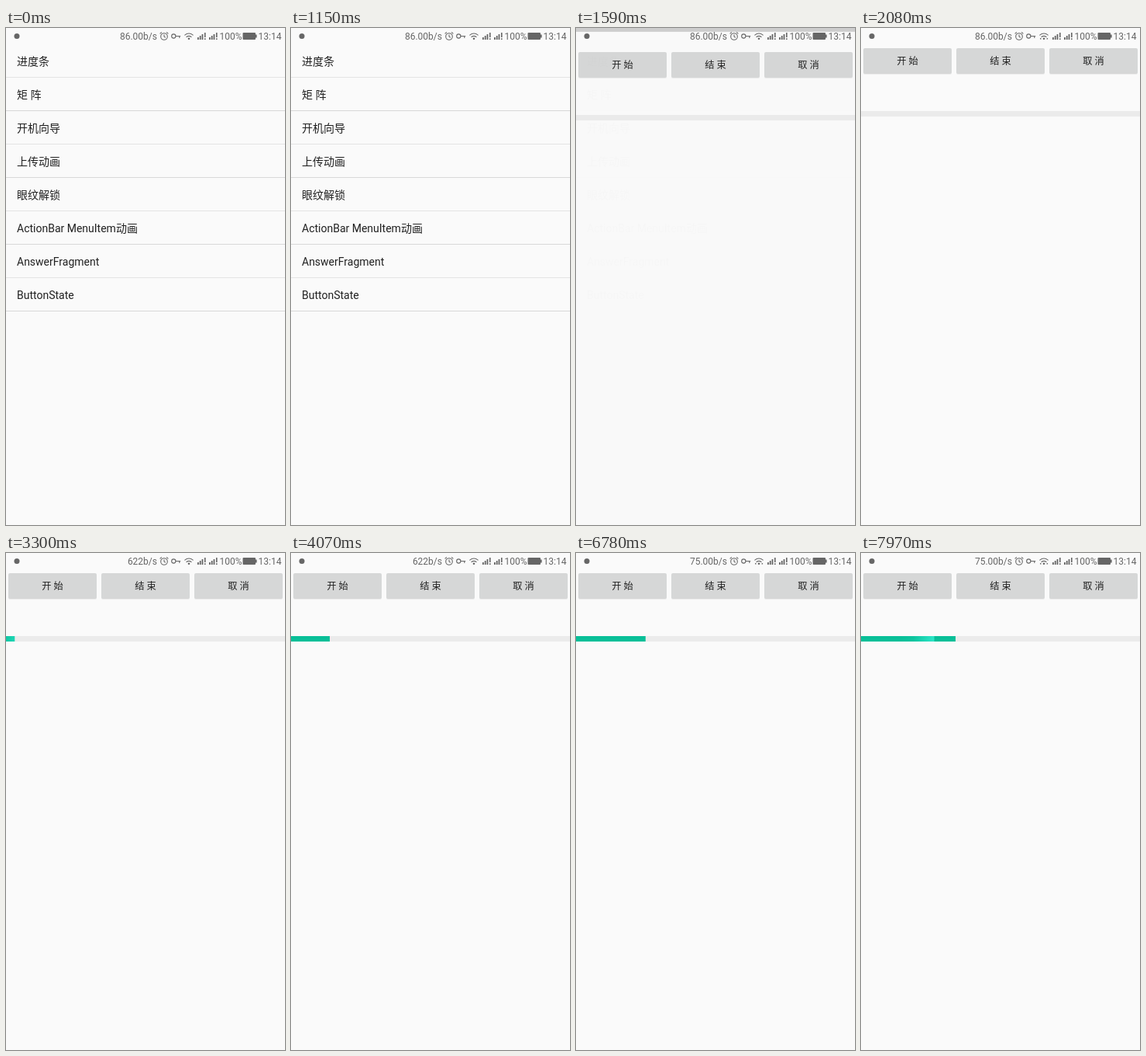
Write an HTML page that moves like this. It is 360 by 640 pixels and loops after 7990 ms.

```html
<!DOCTYPE html>
<html lang="zh-CN">
<head>
<meta charset="utf-8">
<style>
  html, body { margin: 0; width: 100%; height: 100%; overflow: hidden; background: #000; }
  svg { display: block; width: 100vw; height: 100vh; }
  text { font-family: Roboto, "Noto Sans CJK SC", "Noto Sans CJK", sans-serif; white-space: pre; }
  .bg { fill: #fafafa; }
  .row { font-size: 14px; fill: #212121; }
  .btn { font-size: 12.25px; font-weight: 500; fill: #212121; text-anchor: middle; }
  #status { font-size: 12px; fill: #666; stroke: none; }
  #status .line { fill: none; stroke: #666; }
</style>
</head>
<body>
<svg viewBox="0 0 360 640">
  <defs>
    <linearGradient id="glow">
      <stop offset="0" stop-color="#2ce6c8" stop-opacity="0"/>
      <stop offset=".4" stop-color="#2ce6c8" stop-opacity=".12"/>
      <stop offset="1" stop-color="#2ce6c8"/>
    </linearGradient>
    <clipPath id="barClip"><rect id="clipRect" x="0" y="107" width="0" height="7"/></clipPath>
  </defs>

  <g id="list"><rect class="bg" width="360" height="640"/></g>

  <g id="page">
    <rect class="bg" width="360" height="640"/>
    <rect y="107" width="360" height="7" fill="#ebebeb"/>
    <g clip-path="url(#barClip)">
      <rect y="107" width="360" height="7" fill="#08bf98"/>
      <rect id="shine" y="107" width="45" height="7" fill="url(#glow)"/>
    </g>
  </g>

  <g id="status">
    <circle cx="14" cy="10.5" r="3.5"/>
    <text id="speed" x="195" y="14.5" text-anchor="end"></text>
    <g class="line" stroke-width="1.1">
      <circle cx="204" cy="11" r="4.3"/>
      <path d="M204 8.5V11l1.8 1.4M198.6 7.4l2.3-2M209.4 7.4l-2.3-2"/>
      <circle cx="216.3" cy="10.5" r="2.6"/>
      <path d="M219 10.5h6.2M223.8 10.5v2.4"/>
      <path d="M230.4 9.3q5.6-4.6 11.2 0M232.6 11.7q3.4-2.7 6.8 0"/>
    </g>
    <circle cx="236" cy="13.7" r="1.3"/>
    <path id="traffic" d="M231 13h1.5v1.5h-1.5zM239.6 13h1.5v1.5h-1.5z"/>
    <g id="bars"></g>
    <text x="275.5" y="14.5">100%</text>
    <rect x="305.5" y="6" width="16.5" height="9" rx="1"/>
    <rect x="322" y="8.5" width="1.6" height="4"/>
    <text x="325.5" y="14.5">13:14</text>
  </g>
</svg>
<script>
const $ = id => document.getElementById(id);

function add(parent, tag, attrs, text) {
  const el = document.createElementNS('http://www.w3.org/2000/svg', tag);
  for (const k in attrs) el.setAttribute(k, attrs[k]);
  if (text) el.textContent = text;
  parent.appendChild(el);
  return el;
}

const rows = ['进度条', '矩 阵', '开机向导', '上传动画', '眼纹解锁',
  'ActionBar MenuItem动画', 'AnswerFragment', 'ButtonState'];
rows.forEach((label, i) => {
  add($('list'), 'text', { class: 'row', x: 14, y: 47.5 + 43 * i }, label);
  add($('list'), 'rect', { y: 63 + 43 * i, width: 360, height: 1,
    fill: i % 2 ? '#d8d8d8' : '#e4e4e4' });
});

['开 始', '结 束', '取 消'].forEach((label, i) => {
  const x = 3 + 120 * i;
  add($('page'), 'rect', { x, y: 27, width: 114, height: 33, rx: 2, fill: '#ececec' });
  add($('page'), 'rect', { x, y: 26, width: 114, height: 33, rx: 2, fill: '#d6d7d7' });
  add($('page'), 'text', { class: 'btn', x: x + 57, y: 46.7 }, label);
});

for (const x of [247, 262]) {
  for (let i = 0; i < 3; i++) {
    const h = 3 + 2 * i;
    add($('bars'), 'rect', { x: x + 2.8 * i, y: 15 - h, width: 1.8, height: h });
  }
  add($('bars'), 'rect', { x: x + 9, y: 6, width: 1.6, height: 6 });
  add($('bars'), 'rect', { x: x + 9, y: 13.3, width: 1.6, height: 1.7 });
}

const LOOP = 7990;
const OPEN = 1460;
const SHINE = { start: 3222, period: 1478, speed: 0.3, width: 45 };
const speeds = [[0, '86.00b/s'], [2100, '622b/s'], [5100, '75.00b/s']];
const fill = [[0, 0], [3070, 0], [3865, 38.5], [4070, 50], [4300, 55.5], [4700, 59],
  [5390, 59.5], [5740, 63], [6200, 74], [7970, 122], [LOOP, 122.5]];

const clamp = v => Math.min(1, Math.max(0, v));
const easeOut = (v, power) => 1 - (1 - clamp(v)) ** power;

function track(keys, t) {
  let i = 1;
  while (i < keys.length - 1 && t > keys[i][0]) i++;
  const [t0, a] = keys[i - 1], [t1, b] = keys[i];
  return a + (b - a) * clamp((t - t0) / (t1 - t0));
}

function draw(t) {
  const since = t - OPEN;
  $('list').setAttribute('opacity', 1 - 0.3 * clamp(since / 217));
  $('page').setAttribute('opacity', since < 0 ? 0 : easeOut(since / 200, 4));
  $('page').setAttribute('transform', `translate(0 ${51 * (1 - easeOut(since / 350, 5))})`);

  $('speed').textContent = speeds.filter(s => t >= s[0]).pop()[1];
  const busy = (t >= 1820 && t < 2100) || t >= 5100;
  $('traffic').setAttribute('visibility', busy ? 'visible' : 'hidden');

  $('clipRect').setAttribute('width', track(fill, t));
  const head = t < SHINE.start ? 0 : (t - SHINE.start) % SHINE.period * SHINE.speed;
  $('shine').setAttribute('x', head - SHINE.width);
}

const begin = performance.now();
function tick() {
  draw((performance.now() - begin) % LOOP);
  requestAnimationFrame(tick);
}
tick();
</script>
</body>
</html>
```
